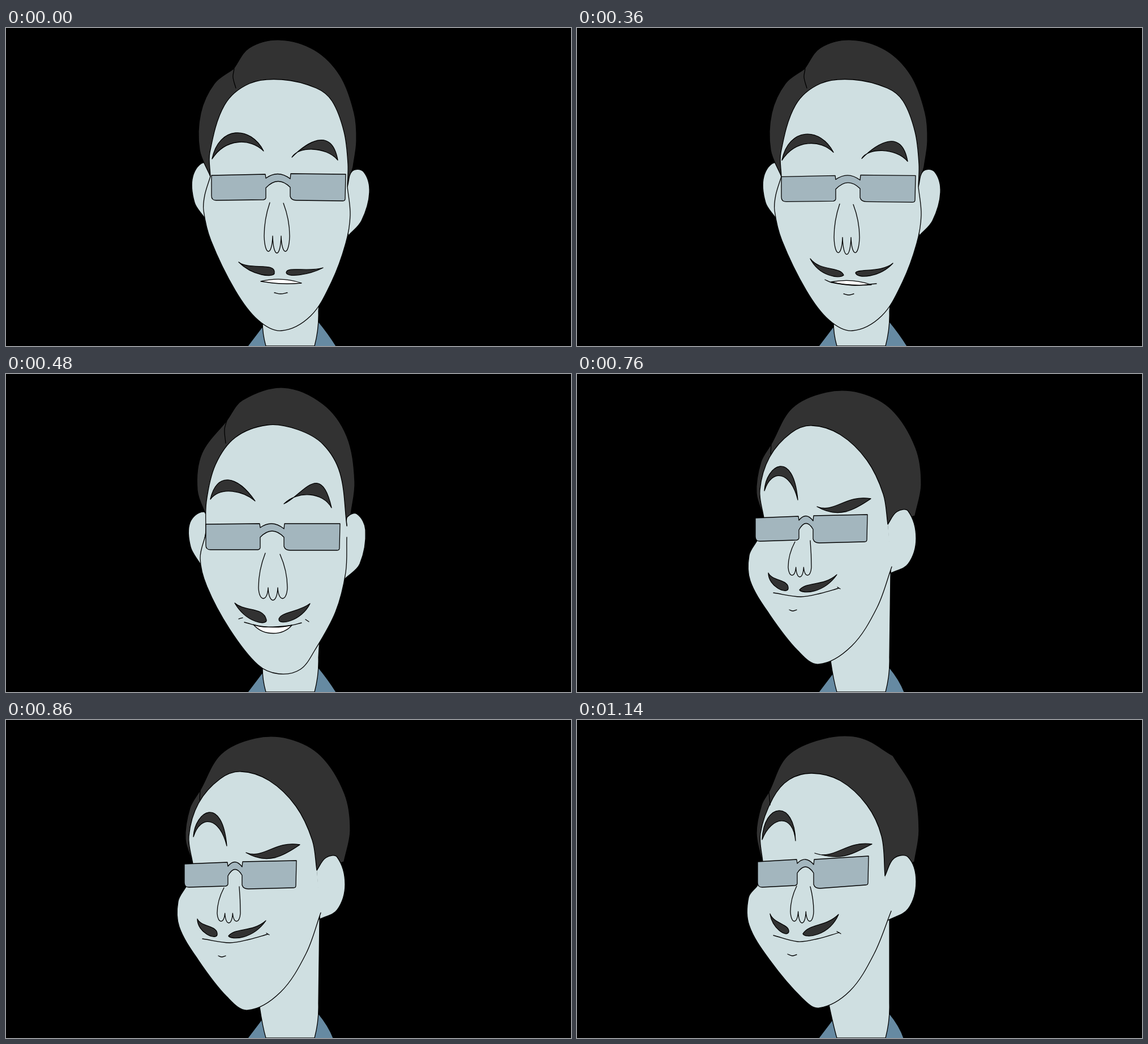
An HTML page with a canvas that plays this animation: 998 px wide and 561 px high, repeating every 1280 ms.

```html
<!DOCTYPE html>
<html lang="en">
<head>
<meta charset="utf-8">
<title>Head turn</title>
<style>
html, body { margin: 0; height: 100%; overflow: hidden; background: #000; }
canvas { display: block; }
</style>
</head>
<body>
<canvas id="stage" width="998" height="561"></canvas>
<script>
const SKIN = '#cfdfe1', HAIR = '#323232', SHIRT = '#668aa2', LENS = '#a3b6be';
const ctx = document.getElementById('stage').getContext('2d');

function paint(fill, d) {
  const path = new Path2D(d);
  if (fill) {
    ctx.fillStyle = fill;
    ctx.fill(path);
  }
  ctx.stroke(path);
}

// Point a third of the way along a segment, following the tangent a -> b.
function handle(p, a, b, reach) {
  const k = reach / 3 / Math.hypot(b[0] - a[0], b[1] - a[1]);
  return [p[0] + (b[0] - a[0]) * k, p[1] + (b[1] - a[1]) * k];
}

function smoothRun(pts) {
  return pts.slice(1).map((q, i) => {
    const p = pts[i], before = pts[i - 1] || p, after = pts[i + 2] || q;
    const reach = Math.hypot(q[0] - p[0], q[1] - p[1]);
    return 'C' + [handle(p, before, q, reach), handle(q, after, p, reach), q].join(' ');
  }).join('');
}

// Smooth curve through points; "/" marks a corner.
function curve(fill, text) {
  const runs = text.split(' / ').map(run => run.split(' ').map(p => p.split(',').map(Number)));
  const d = runs.map((run, i) => smoothRun(i ? [runs[i - 1].at(-1), ...run] : run));
  paint(fill, 'M' + runs[0][0] + d.join(''));
}

const line = text => curve(null, text);

// Two curves from tip to end and back.
function leaf(fill, tip, out, end, back) {
  paint(fill, `M${tip}C${out} ${end}C${back} ${tip}Z`);
}

function body(neckLeft, neckRight, hem) {
  paint(SHIRT, `M427 561L452 528 552 518Q570 540 ${hem} 561`);
  paint(SKIN, `M${neckLeft}Q453 540 459 561H545Q553 530 552 500L${neckRight}`);
}

// Top corners of both lenses, then the height of each lens.
function glasses([ax, ay], [bx, by], [cx, cy], [dx, dy], left, right) {
  const mid = (bx + cx) / 2, top = (by + cy) / 2;
  paint(LENS, `M${ax} ${ay}L${bx} ${by}l1 7Q${mid} ${top - 8} ${cx - 1} ${cy + 9}L${cx} ${cy}L${dx} ${dy}
    L${dx - 1} ${dy + right - 4}q0 4-4 4L${cx + 10} ${cy + right}q-9 0-11-7V${cy + 24}
    Q${mid} ${top + 2} ${bx + 1} ${by + 24}V${by + left - 4}q0 3-4 4L${ax + 8} ${ay + left - 1}q-8 0-8-8Z`);
}

// Two sides from the given tops, joined by three lobes.
function nose([ax, ay], [bx, by], left, right, bottom, depth) {
  const w = (right - left) / 3, notch = bottom - depth;
  let d = `M${ax} ${ay}Q${left} ${(ay + notch) / 2} ${left} ${notch}`;
  for (let i = 0; i < 3; i++) {
    const x = left + i * w, low = bottom + depth / 3 + (i === 1 ? 4 : 0);
    d += `C${x + 1} ${low} ${x + w - 1} ${low} ${x + w} ${notch}`;
  }
  paint(null, d + `Q${right} ${(by + notch) / 2} ${bx} ${by}`);
}

function frontHead(dx, dy) {
  body('453 518', '554 468', 583);
  curve(SKIN, '361,262 / 352,237 330,262 333,308 350,334');
  curve(HAIR, '361,262 / 342,215 344,150 368,98 402,72 / 430,35 484,21 545,39 590,84 615,150 619,200 613,245 / 603,280');
  curve(SKIN, '603,280 / 612,252 632,254 642,290 628,340 605,366');
  curve(SKIN, '603,280 608,330 600,380 575,448 538,508 486,534 445,515 405,463 362,375 349,322 351,295 361,262 / 360,220 386,136 430,98 487,91 548,106 576,129 597,183 604,240 603,280');
  line('403,72 401,87 406,106');
  ctx.save();
  ctx.translate(dx, dy);
  leaf(HAIR, '364 231', '376 172 432 172', '455 217', '432 194 388 194');
  leaf(HAIR, '505 228', '530 203 575 172', '586 233', '565 208 515 209');
  glasses([363, 260], [458, 258], [503, 257], [600, 258], 45, 47);
  nose([466, 308], [490, 309], 456, 501, 394, 27);
  ctx.restore();
}

function rest() {
  frontHead(0, 0);
  leaf(HAIR, '411 413', '430 428 478 412', '474 433', '472 440 436 438');
  leaf(HAIR, '560 423', '535 431 497 420', '495 431', '495 441 535 436');
  leaf('#fff', '450 447', '470 442 495 441', '522 450', '490 453 470 450');
  line('474,467 485,469 497,467');
}

function smirk() {
  frontHead(-2, 2.3);
  leaf(HAIR, '412 407', '430 430 465 420', '471 436', '463 443 428 438');
  leaf(HAIR, '558 415', '538 432 495 424', '492 432', '495 443 535 440');
  leaf('#fff', '449 448', '475 443 500 446', '520 453', '490 455 468 453');
  line('438,444 450,449 490,454 529,451');
  line('471,469 480,471 489,469');
}

function smile() {
  body('453 518', '554 468', 583);
  curve(SKIN, '355,262 / 349,243 325,262 326,305 343,335');
  curve(HAIR, '355,253 / 338,205 346,140 390,82 / 418,46 490,24 560,53 602,110 616,190 609,248 / 602,268');
  curve(SKIN, '602,268 / 603,252 620,247 635,275 625,335 599,361');
  curve(SKIN, '602,288 600,350 582,420 545,488 520,521 482,529 445,513 395,450 355,375 343,325 353,282 / 354,225 370,160 405,112 462,90 515,98 560,124 590,175 602,268');
  line('390,82 386,98 388,122');
  leaf(HAIR, '361 221', '372 172 408 178', '440 224', '420 207 380 197');
  leaf(HAIR, '491 229', '522 216 556 150', '575 236', '560 208 515 205');
  glasses([353, 265], [448, 264], [492, 264], [590, 264], 46, 47);
  nose([458, 316], [484, 318], 446, 497, 396, 19);
  leaf(HAIR, '404 404', '422 420 455 410', '460 434', '462 444 425 440');
  leaf(HAIR, '537 405', '518 420 483 420', '482 433', '482 444 522 436');
  leaf('#fff', '437 442', '458 448 485 448', '505 443', '490 462 455 463');
  line('421,438 455,446 500,444 522,439');
  line('411,432 418,430');
  line('529,433 535,437');
}

function turn() {
  body('453 518', '560 386', 583);
  curve(SKIN, '333,272 / 323,242 308,285 318,324');
  curve(HAIR, '333,270 / 321,210 335,140 365,96 / 410,47 480,28 553,52 605,140 611,190 602,243 / 563,257');
  curve(SKIN, '563,257 580,242 601,245 612,280 600,328 572,350');
  curve(SKIN, '576,300 570,355 545,420 505,485 457,523 420,504 370,440 330,370 318,335 323,305 / 333,270 / 330,205 352,145 385,112 430,91 463,90 502,107 534,142 554,205 563,257');
  line('365,96 359,115 359,131');
  leaf(HAIR, '336 215', '340 170 384 178', '398 220', '380 196 346 195');
  leaf(HAIR, '445 225', '480 232 495 209', '539 223', '505 236 485 235');
  glasses([323, 273], [397, 269], [438, 268], [525, 265], 46, 47);
  nose([397, 316], [420, 312], 386, 419, 383, 16);
  leaf(HAIR, '359 392', '370 404 390 392', '388 414', '386 421 366 417');
  leaf(HAIR, '467 385', '445 400 415 395', '401 413', '402 420 445 420');
  leaf('#fff', '382 422', '410 426 430 421', '452 415', '430 430 400 430');
  line('370,420 415,424 450,416 478,405');
  line('483,401 488,401');
  line('409,451 422,451');
}

function lookAside() {
  body('448 506', '554 350', 578);
  curve(HAIR, '331,254 / 317,210 325,155 343,124 / 380,60 440,32 500,33 556,63 598,130 608,195 597,250 / 549,265');
  curve(SKIN, '549,265 565,243 585,242 599,290 585,335 555,351');
  curve(SKIN, '556,340 530,412 485,480 427,512 390,488 340,424 306,365 304,320 318,294 / 330,254 / 323,205 340,147 378,104 415,91 465,107 512,152 541,212 549,265');
  line('343,124 342,141');
  leaf(HAIR, '331 206', '334 160 382 132', '390 222', '378 172 344 165');
  leaf(HAIR, '424 234', '455 246 475 212', '519 220', '490 240 462 256');
  glasses([315, 254], [391, 251], [418, 250], [513, 248], 42, 48);
  nose([385, 296], [412, 294], 373, 414, 355, 14);
  leaf(HAIR, '338 351', '345 366 375 362', '373 379', '370 389 338 375');
  leaf(HAIR, '459 354', '435 375 405 366', '393 381', '398 388 435 388');
  line('347,386 395,393 430,387 462,378');
  line('460,376 465,379');
  line('375,416 381,418 388,416');
}

function settle() {
  body('445 502', '552 350', 577);
  curve(HAIR, '327,250 / 317,200 326,150 339,127 / 372,63 435,33 500,31 558,63 / 595,125 604,195 596,250 / 544,275');
  curve(SKIN, '544,275 560,244 585,242 599,285 585,333 550,353');
  curve(SKIN, '555,337 525,412 482,478 428,508 398,491 340,423 304,362 303,313 318,293 / 328,250 / 324,200 346,138 375,105 415,94 465,107 512,150 538,205 544,275');
  line('339,127 341,150');
  leaf(HAIR, '327 211', '330 145 384 140', '386 213', '382 165 344 168');
  leaf(HAIR, '420 235', '455 248 475 212', '521 219', '480 240 465 248');
  glasses([319, 250], [388, 246], [419, 246], [515, 240], 46, 51);
  nose([388, 293], [412, 294], 377, 418, 355, 17);
  leaf(HAIR, '341 342', '348 360 376 360', '374 374', '370 384 345 368');
  leaf(HAIR, '462 343', '438 366 412 358', '399 377', '402 386 445 382');
  line('347,380 390,391 425,386 463,375');
  line('459,373 466,377');
  line('372,413 380,416 388,414');
}

function poseAt(t) {
  if (t < 360) return rest;
  if (t < 480) return smirk;
  if (t < 600) return smile;
  if (t < 760) return turn;
  return t < 920 ? lookAside : settle;
}

ctx.lineWidth = 1.3;
ctx.lineJoin = ctx.lineCap = 'round';
const start = performance.now();

function tick() {
  ctx.clearRect(0, 0, 998, 561);
  poseAt((performance.now() - start) % 1280)();
  requestAnimationFrame(tick);
}
tick();
</script>
</body>
</html>
```
